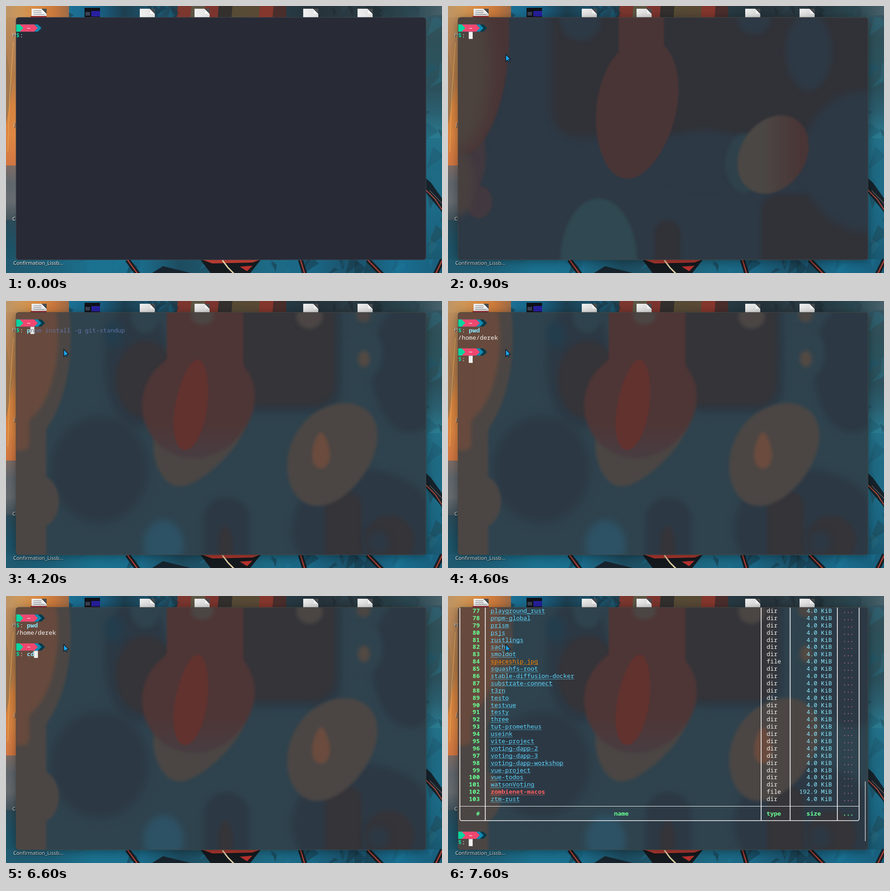
Animation, 955 px wide and 586 px high, one loop 8000 ms. Source, as an HTML page with a canvas:

```html
<!DOCTYPE html>
<html lang="en">
<head>
<meta charset="utf-8">
<title>Terminal</title>
<style>
html, body { margin: 0; width: 100%; height: 100%; overflow: hidden; background: #1d5266; }
canvas { display: block; }
</style>
</head>
<body>
<canvas id="stage" width="955" height="586"></canvas>
<script>
const W = 955, H = 586, LOOP = 8000;
const CELL = 7.95, ROW = 15.89, LEFT = 22, FIRST = 48.4;
const MONO = '"Noto Sans Mono", "DejaVu Sans Mono", monospace';
const SANS = '"Noto Sans", "Open Sans", sans-serif';
const WHITE = '#f4f4f0', GREEN = '#69ff94', CYAN = '#8be9fd', BLUE = '#5fd7ff';
const view = document.getElementById('stage').getContext('2d');

function layer(paint) {
  const c = document.createElement('canvas');
  c.width = W;
  c.height = H;
  paint(c.getContext('2d'));
  return c;
}

let seed = 7;
function random(a, b) {
  seed = (seed * 16807) % 2147483647;
  return a + (b - a) * seed / 2147483647;
}

function windowPath(g) {
  g.beginPath();
  g.roundRect(22, 25, 898, 532, 6);
}

function poly(g, color, ...p) {
  g.fillStyle = color;
  g.beginPath();
  for (let i = 0; i < p.length; i += 2) g.lineTo(p[i], p[i + 1]);
  g.closePath();
  g.fill();
}

function line(g, color, width, ...p) {
  g.strokeStyle = color;
  g.lineWidth = width;
  g.beginPath();
  for (let i = 0; i < p.length; i += 2) g.lineTo(p[i], p[i + 1]);
  g.stroke();
}

function gradient(g, x0, y0, x1, y1, colors) {
  const grad = g.createLinearGradient(x0, y0, x1, y1);
  colors.forEach((c, i) => grad.addColorStop(i / (colors.length - 1), c));
  return grad;
}

function ramp(g, x, y, w, h, ...colors) {
  g.fillStyle = w > h ? gradient(g, x, 0, x + w, 0, colors) : gradient(g, 0, y, 0, y + h, colors);
  g.fillRect(x, y, w, h);
}

// Slanted slivers of paint inside a box
function shards(g, x, y, w, h, count, ...colors) {
  g.save();
  g.beginPath();
  g.rect(x, y, w, h);
  g.clip();
  g.globalAlpha = .45;
  for (let i = 0; i < count; i++) {
    const cx = random(x, x + w), cy = random(y, y + h), slant = random(-20, 20), size = random(6, 26);
    poly(g, colors[i % colors.length], cx, cy - size, cx + size, cy - 4, cx + slant, cy + size);
  }
  g.restore();
}

// Egg shape with a soft edge: taper widens the lower end, lean tilts the axis
function drop(g, color, soft, x, y, rx, ry, taper = 0, lean = 0) {
  g.filter = `blur(${soft}px)`;
  g.fillStyle = color;
  g.beginPath();
  for (let a = 0; a < 6.28; a += .08) {
    const c = Math.cos(a);
    g.lineTo(x + rx * Math.sin(a) * (1 - taper * c) + lean * c, y - ry * c);
  }
  g.fill();
  g.filter = 'none';
}

function box(g, color, soft, x, y, w, h, r) {
  g.filter = `blur(${soft}px)`;
  g.fillStyle = color;
  g.beginPath();
  g.roundRect(x, y, w, h, r);
  g.fill();
  g.filter = 'none';
}

function fileIcon(g, x) {
  ramp(g, x, 6, 33, 19, '#f1f1f1', '#dedede');
  poly(g, '#4a4d50', x + 22, 6, x + 33, 6, x + 33, 17);
  poly(g, '#fafafa', x + 23, 7, x + 32, 17, x + 23, 17);
  line(g, '#23272a', 1, x + 22.5, 6, x + 33, 16.5);
}

function label(g, s, x, y) {
  g.font = '11.2px ' + SANS;
  g.fillStyle = '#0b0f12';
  g.fillText(s, x + 1, y + 1);
  g.fillStyle = '#f2f2f2';
  g.fillText(s, x, y);
}

function wallpaper(g) {
  ramp(g, 0, 0, 140, 26, '#bd9566', '#cf9657', '#d9893f', '#c9783c', '#9a6a48');
  ramp(g, 138, 0, 242, 26, '#1c7194', '#18648a', '#1d3f50', '#1d5670', '#23404d');
  ['#7c372f', '#5c5745', '#7c352e', '#33302e', '#574b36', '#594a36', '#85372d', '#4a2e2c']
    .forEach((c, i) => poly(g, c, 376 + i * 30, 0, 406 + i * 30, 0, 404 + i * 30, 26, 374 + i * 30, 26));
  ramp(g, 614, 0, 342, 26, '#263a43', '#26323a', '#2b3a42', '#263940', '#2b4852', '#486069');
  shards(g, 138, 0, 242, 26, 9, '#1d2d38', '#1a5f7c');
  shards(g, 614, 0, 300, 26, 12, '#1d282f', '#2d434d');

  ramp(g, 0, 25, 23, 325, '#bd8e5e', '#b38255', '#b27b4a', '#d6833f', '#de8742', '#d27642');
  ramp(g, 0, 350, 23, 120, '#7d6c65', '#60676d', '#666b70', '#42525c');
  ramp(g, 0, 470, 23, 116, '#2b4a58', '#1d5266', '#20596e');
  poly(g, '#a37950', 0, 95, 13, 180, 4, 240, 0, 260);
  line(g, '#f0b257', 1, 16, 80, 8, 200, 4, 320);

  ramp(g, 919, 20, 36, 270, '#365561', '#2f5058', '#2b535d', '#2b505c', '#2a6071', '#2a7c91');
  ramp(g, 919, 290, 36, 270, '#237189', '#1f6a83', '#1d6c88', '#1b6581', '#1a5870');
  shards(g, 919, 25, 36, 520, 16, '#21434f', '#2a6b7c', '#1d586e');
  poly(g, '#16232c', 920, 378, 931, 388, 955, 422, 955, 452, 920, 410);
  line(g, '#b54b3b', 2, 920, 404, 940, 424, 955, 447);
  line(g, '#ad8a77', 1, 928, 405, 955, 433);

  ramp(g, 0, 556, 955, 30, '#205a70', '#1d6079', '#1b7290', '#1b6f8f', '#1d4c60', '#205b70', '#1d6b86', '#1a6786', '#1b4f67', '#196f92', '#195d7a');
  shards(g, 100, 556, 855, 30, 28, '#18313e', '#1a5a74', '#1c7594');
  poly(g, '#18242d', 320, 586, 344, 571, 405, 586);
  poly(g, '#151a1f', 426, 557, 558, 557, 535, 586, 448, 586);
  poly(g, '#b63a31', 430, 557, 556, 557, 540, 563, 452, 565);
  poly(g, '#b8322e', 512, 572, 540, 570, 528, 582);
  line(g, '#e2d0a5', 3, 474, 558, 486, 574, 500, 588);
  [[278, 12], [650, 5], [808, 16], [948, -8]].forEach(([x, tilt]) => {
    line(g, '#181f26', 11, x - tilt, 557, x + tilt, 590);
    line(g, '#b64033', 2.5, x - tilt, 557, x + tilt, 590);
  });
}

const desk = layer(g => {
  wallpaper(g);
  [56, 293, 413, 651, 770].forEach(x => fileIcon(g, x));
  for (let y = 10; y < 22; y += 4) line(g, '#8e9296', 1, 60, y + .5, y < 17 ? 77 : 84, y + .5);
  box(g, '#a3262c', 0, 54, 22, 35, 3, 0);
  box(g, '#101116', 0, 172, 4, 34, 21, 0);
  box(g, '#2720a0', 0, 187, 11, 19, 12, 0);
  box(g, '#3c4255', 0, 174, 13, 10, 8, 0);
  label(g, 'H', 14, 67);
  label(g, 'j', 17, 263);
  label(g, 'C', 14, 471);
  label(g, 'Confirmation_Lissb...', 16, 568);
});

const shadow = layer(g => {
  g.shadowColor = 'rgba(0,0,0,.4)';
  g.shadowBlur = 22;
  g.shadowOffsetY = 3;
  windowPath(g);
  g.fill();
});

// Blurred wallpaper behind the window, while it fades in
const dim = layer(g => {
  const dark = '#313238', red = '#4a3536', slate = '#2d3945', gray = '#4b4744';
  g.fillStyle = slate;
  g.fillRect(0, 0, W, H);
  box(g, dark, 8, 226, -60, 750, 348, 60);
  box(g, dark, 4, 685, 412, 300, 220, 40);
  drop(g, slate, 8, 560, 335, 110, 62);
  drop(g, slate, 8, 920, 340, 145, 155);
  box(g, dark, 3, 452, 470, 57, 150, 28);
  drop(g, slate, 5, 290, 30, 45, 46);
  drop(g, slate, 5, 670, 30, 36, 32);
  drop(g, slate, 6, 790, 100, 50, 85);

  drop(g, '#41393f', 2, 68, 430, 29, 36);
  drop(g, '#41393f', 3, 48, 330, 35, 80);
  drop(g, red, 2, 22, 60, 112, 270);
  drop(g, '#4c423e', 14, 22, 130, 72, 190);
  drop(g, '#48403f', 8, 28, 390, 28, 70);

  box(g, red, 1.5, 374, 0, 99, 200, 10);
  drop(g, red, 1.5, 413, 225, 88, 154, -.08, 20);

  drop(g, '#2f424c', 4, 650, 345, 42, 65);
  drop(g, gradient(g, 690, 0, 775, 0, [gray, red]), 2, 712, 326, 76, 86, 0, 18);
  drop(g, '#304851', 3, 330, 560, 84, 138);
});

// The same wallpaper once the window has settled
const lit = layer(g => {
  const dark = '#343439', slate = '#2c3945', teal = '#2f434e', warm = '#4b4644';
  g.fillStyle = teal;
  g.fillRect(0, 0, W, H);
  drop(g, slate, 10, 205, 370, 108, 118);
  drop(g, slate, 8, 285, 140, 70, 140);
  drop(g, dark, 5, 305, 172, 66, 86);
  box(g, slate, 8, 510, -40, 225, 286, 50);
  box(g, dark, 6, 510, -40, 212, 272, 50);
  drop(g, slate, 7, 885, 145, 85, 145);
  box(g, slate, 6, 432, 430, 102, 200, 50);
  drop(g, dark, 4, 481, 540, 17, 48);
  drop(g, slate, 8, 785, 500, 160, 132);
  box(g, dark, 4, 698, 418, 82, 200, 30);
  drop(g, dark, 5, 840, 525, 55, 55);
  drop(g, slate, 8, 815, 530, 22, 24);
  drop(g, teal, 5, 305, 30, 32, 40);
  drop(g, '#233d4d', 8, 235, 72, 20, 28);
  drop(g, teal, 6, 783, 115, 42, 56);
  drop(g, '#2d5265', 8, 345, 535, 44, 54);

  box(g, warm, 2.5, -20, 0, 108, 620, 0);
  drop(g, warm, 2.5, 22, 80, 120, 240);
  drop(g, warm, 2.5, 76, 440, 40, 56);
  drop(g, '#674a3d', 4, 22, 80, 92, 190);
  box(g, '#674a3d', 4, -20, 100, 71, 228, 14);

  drop(g, warm, 3, 415, 310, 92, 97, -.3, 35);
  const red = gradient(g, 0, 265, 0, 345, ['#4f3636', '#483d42']);
  box(g, red, 2, 352, 0, 168, 200, 15);
  drop(g, red, 3, 421, 225, 123, 120, -.05, 10);
  drop(g, '#62322f', 1.5, 406, 228, 35, 99, .1, 14);

  drop(g, warm, 3, 712, 337, 94, 113, -.1, 30);
  drop(g, '#6a4b3e', 3, 690, 328, 19, 40, .3);
  drop(g, warm, 4, 430, 32, 25, 20);
  drop(g, warm, 4, 665, 34, 29, 27);
  drop(g, warm, 4, 783, 32, 16, 15);
  drop(g, '#534943', 4, 784, 127, 13, 18);
});

function text(s, col, row, color = WHITE, bold = false) {
  view.font = (bold ? 'bold ' : '') + '13.25px ' + MONO;
  view.fillStyle = color;
  view.fillText(s, LEFT + col * CELL, FIRST + row * ROW + 4.5);
}

function arrow(color, tip, y) {
  const x = LEFT + tip * CELL;
  poly(view, color, LEFT, y - 7.9, x - CELL, y - 7.9, x, y, x - CELL, y + 7.9, LEFT, y + 7.9);
}

function prompt(row, faint) {
  const y = FIRST + row * ROW;
  arrow(faint ? '#262d39' : '#073b4c', 8, y);
  arrow('#118ab2', 7, y);
  arrow('#ef476f', 6, y);
  arrow('#06d6a0', 2, y);
  text('~', 3, row, '#ffffff', true);
  text('$', 0, row + 1, '#06d6a0', true);
  text(':', 1, row + 1);
}

function input(row, typed, hint = '', bold = true, cursor = true) {
  const col = 3 + typed.length;
  text(hint, col, row, '#6272a4');
  text(typed, 3, row, CYAN, bold);
  if (!cursor) return;
  view.fillStyle = '#f0f0f0';
  view.fillRect(LEFT + col * CELL - .4, FIRST + row * ROW - 7.6, 8.6, 15.6);
  if (hint) text(hint[0], col, row, '#686b78');
}

const names = `playground_rust pnpm-global prism psjs rustlings sach smoldot spaceship.jpg squashfs-root
  stable-diffusion-docker substrate-connect t3rn testo testvue testy three tut-prometheus useink
  vite-project voting-dapp-2 voting-dapp-3 voting-dapp-workshop vue-project vue-todos watsonVoting
  zombienet-macos ztm-rust`.split(/\s+/);
const files = {
  'spaceship.jpg': { color: '#ff8700', size: '4.0 MiB' },
  'zombienet-macos': { color: '#ff5f5f', size: '192.9 MiB', bold: true }
};

function listing() {
  names.forEach((name, i) => {
    const row = i - 1, id = String(77 + i), file = files[name];
    const { color = BLUE, size = '4.0 KiB', bold = false } = file || {};
    text(id, 6 - id.length, row, GREEN, true);
    text(name, 9, row, color, bold);
    view.setLineDash([2, 1.5]);
    const y = Math.round(FIRST + row * ROW + 6) + .5;
    line(view, color, 1, 93.5, y, 93.5 + name.length * CELL, y);
    view.setLineDash([]);
    text(file ? 'file' : 'dir', 85, row);
    text(size, 103 - size.length, row, CYAN);
    text('...', 106, row, '#ff79c6');
  });
  const heads = { '#': 5, name: 43, type: 85, size: 96, '...': 106 };
  for (const head in heads) text(head, heads[head], 27, GREEN, true);

  view.strokeStyle = '#f4f4f4';
  view.lineWidth = 1.7;
  view.beginPath();
  view.roundRect(26, -20, 874.5, 513, 4);
  [7.5, 83.5, 91.5, 104.5].forEach(col => {
    view.moveTo(LEFT + col * CELL, 0);
    view.lineTo(LEFT + col * CELL, 493);
  });
  view.stroke();
  line(view, '#f4f4f4', 1.2, 26, 461.5, 900, 461.5);
  view.fillStyle = '#a3a9ac';
  view.fillRect(913, 407, 2, 131);
}

function firstInput(t) {
  if (t < 4200) input(1, '');
  else if (t < 4300) input(1, 'p', 'npm install -g git-standup');
  else if (t < 4400) input(1, 'pw', 'd', false);
  else input(1, 'pwd', '', true, t < 4600);
}

function secondInput(t) {
  if (t < 5700) input(5, '');
  else if (t < 5800) input(5, 'c', 'lear', false);
  else if (t < 5900) input(5, 'cd', ' rustlings/');
  else if (t < 6600) input(5, 'cd ', 'rustlings/');
  else if (t < 6800) input(5, 'cd');
  else if (t < 6900) input(5, 'c', 'lear', false);
  else if (t < 7300) input(5, '');
  else input(5, 'ls');
}

function shell(t) {
  if (t >= 7500) {
    listing();
    if (t >= 7600) {
      prompt(30);
      input(31, '');
    }
    return;
  }
  prompt(0, t < 500);
  if (t >= 500) firstInput(t);
  if (t < 4600) return;
  text('/home/derek', 0, 2);
  prompt(4);
  secondInput(t);
}

function backdrop(t) {
  const step = Math.floor(Math.min(t, 700) / 100) - 4;
  view.fillStyle = '#282a36';
  view.fillRect(22, 25, 898, 532);
  view.globalAlpha = t < 500 ? 0 : t < 900 ? step * .22 : 1;
  view.drawImage(t < 1000 ? dim : lit, 0, 0);
  view.globalAlpha = 1;
}

function pointer(x, y) {
  view.save();
  view.translate(x, y);
  poly(view, '#1ea7ee', 0, 0, 0, 16, 3.6, 12.6, 6, 17, 8, 16, 6, 11.5, 10.5, 11);
  view.strokeStyle = '#0a1118';
  view.lineWidth = 1.2;
  view.stroke();
  view.restore();
}

function draw(t) {
  view.drawImage(desk, 0, 0);
  if (t >= 500) view.drawImage(shadow, 0, 0);
  view.save();
  windowPath(view);
  view.clip();
  backdrop(t);
  shell(t);
  view.restore();
  windowPath(view);
  view.strokeStyle = t < 500 ? '#3b444c' : '#454645';
  view.lineWidth = 1;
  view.stroke();
  if (t >= 500) pointer(126.5, 106);
}

const start = performance.now();
function tick() {
  draw((performance.now() - start) % LOOP);
  requestAnimationFrame(tick);
}
tick();
</script>
</body>
</html>
```
